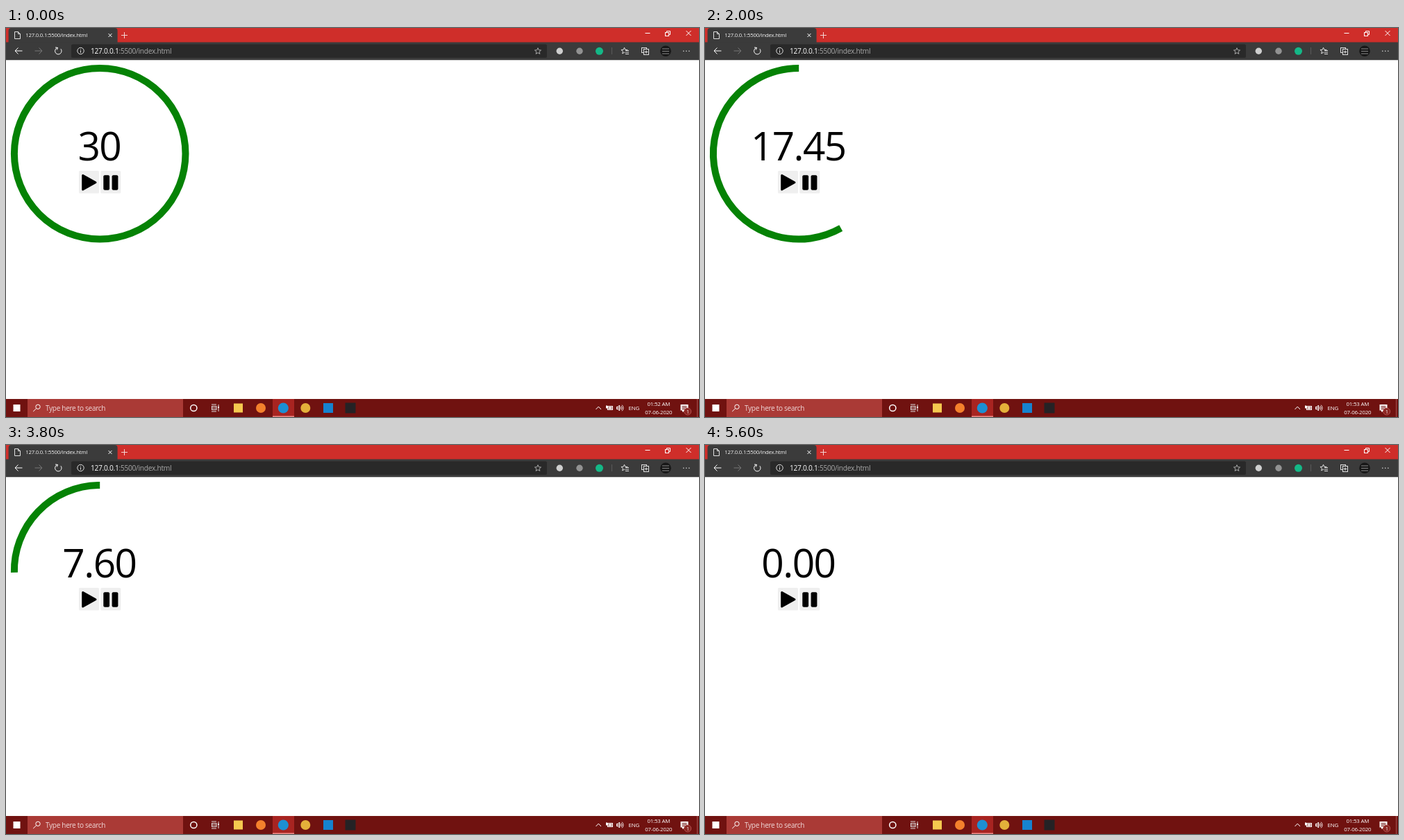
These frames come from a looping animation (998 by 561 pixels, 5800 ms). An HTML page with a canvas:

```html
<!DOCTYPE html>
<html lang="en">
<head>
<meta charset="utf-8">
<title>Countdown</title>
<style>
html, body { margin: 0; width: 100%; height: 100%; overflow: hidden; background: #fff; }
canvas { display: block; }
</style>
</head>
<body>
<canvas id="stage" width="998" height="561"></canvas>
<script>
const ctx = document.getElementById('stage').getContext('2d');
const TAU = Math.PI * 2, STEP = 200, LOOP = 5800;
const DARK = '#3b3b3b', BAR = '#701210', INK = '#e0e0e0', WHITE = '#fff';
// [step, seconds left]
const KEYS = [[0, 30], [7, 21.1], [10, 17.45], [15, 11.9], [19, 7.6], [24, 2.65], [26.75, 0], [29, 0]];

function rect(x, y, w, h, color, r = 0) {
  ctx.fillStyle = color;
  ctx.beginPath();
  ctx.roundRect(x, y, w, h, r);
  ctx.fill();
}

function disc(x, y, r, color) {
  rect(x - r, y - r, 2 * r, 2 * r, color, r);
}

function square(x, y, size, color) {
  rect(x - size / 2, y - size / 2, size, size, color);
}

function arc(x, y, r, color, width = 1, from = 0, to = TAU) {
  ctx.strokeStyle = color;
  ctx.lineWidth = width;
  ctx.beginPath();
  ctx.arc(x, y, r, from, to);
  ctx.stroke();
}

function frame(x, y, w, h, color) {
  ctx.strokeStyle = color;
  ctx.lineWidth = 1;
  ctx.strokeRect(x, y, w, h);
}

function line(color, ...points) {
  ctx.strokeStyle = color;
  ctx.lineWidth = 1;
  ctx.beginPath();
  for (const [x, y] of points) ctx.lineTo(x, y);
  ctx.stroke();
}

function plus(x, y, r, color) {
  line(color, [x - r, y], [x + r, y]);
  line(color, [x, y - r], [x, y + r]);
}

function cross(x, y, r, color) {
  line(color, [x - r, y - r], [x + r, y + r]);
  line(color, [x - r, y + r], [x + r, y - r]);
}

// Evenly spaced horizontal strokes
function rows(x, y, w, gap, color) {
  for (let i = 0; i < 3; i++) line(color, [x, y + i * gap], [x + w, y + i * gap]);
}

function arrow(x, y, dir, color) {
  const tip = x + dir * 5;
  line(color, [x - dir * 5.5, y], [tip, y]);
  line(color, [tip - dir * 4.5, y - 4.5], [tip, y], [tip - dir * 4.5, y + 4.5]);
}

function star(x, y, r, color) {
  const points = Array.from({ length: 11 }, (_, i) => {
    const a = i * TAU / 10 - TAU / 4, d = i % 2 ? r * 0.45 : r;
    return [x + d * Math.cos(a), y + d * Math.sin(a)];
  });
  line(color, ...points);
}

function text(str, x, y, size, color, align = 'left') {
  ctx.font = `${size}px "Open Sans", "Noto Sans", sans-serif`;
  ctx.letterSpacing = `${-0.028 * size}px`;
  ctx.textAlign = align;
  ctx.fillStyle = color;
  ctx.fillText(str, x, y);
  return x + ctx.measureText(str).width;
}

function tabStrip() {
  rect(0, 0, 998, 21, '#cf2e2a');
  rect(3.6, 0, 157, 24, DARK, [4, 4, 0, 0]);
  line(INK, [17.5, 5.5], [12.5, 5.5], [12.5, 15.5], [20.5, 15.5], [20.5, 8.5], [17.5, 5.5], [17.5, 8.5], [20.5, 8.5]);
  text('127.0.0.1:5500/index.html', 28.2, 13, 7.8, '#f4f4f4');
  cross(150, 10.5, 2.5, WHITE);
  plus(170.5, 10.5, 4.5, '#f3d5d4');
  line(WHITE, [920.5, 7.5], [927.5, 7.5]);
  frame(949.5, 6.5, 5, 5, WHITE);
  line(WHITE, [951.5, 6.5], [951.5, 4.5], [956.5, 4.5], [956.5, 9.5], [954.5, 9.5]);
  cross(983, 7.5, 3.5, WHITE);
}

function toolbar() {
  rect(0, 20.6, 998, 25.7, DARK);
  arrow(18, 33, -1, WHITE);
  arrow(47, 33, 1, '#777');
  arc(75.3, 33.2, 4.7, WHITE, 1, -0.7, 4.5);
  line(WHITE, [71, 28], [74.5, 28.4], [73.4, 31.5]);

  rect(94, 23.5, 685, 19.5, '#292929', 2);
  arc(107.5, 33, 4.7, INK);
  rect(107, 32.2, 1, 3.6, INK);
  square(107.5, 30.7, 1, INK);
  text(':5500/index.html', text('127.0.0.1', 122, 37, 10.2, WHITE), 37, 10.2, '#a9a9a9');

  star(766, 33.5, 4.8, '#aaa');
  disc(797.3, 33.3, 4.7, '#cfcfcf');
  disc(826, 33.3, 4.7, '#929292');
  disc(854.5, 33.3, 5.5, '#14b887');
  rect(872, 28, 1, 10, '#5a5a5a');
  star(890.5, 33, 4.8, INK);
  square(894.5, 35.5, 6, DARK);
  rows(892, 32.5, 5, 2.5, INK);
  frame(915.5, 28.5, 7, 7, INK);
  rect(918, 30, 8, 9, DARK);
  frame(918.5, 30.5, 7, 8, INK);
  plus(922, 34.5, 2.2, INK);

  disc(950, 33.3, 7.8, '#171717');
  rows(945, 30, 10, 3.5, '#888');
  for (let i = 0; i < 3; i++) disc(975.8 + i * 4, 33.3, 0.8, INK);
}

function launchers() {
  square(15.5, 548, 10, WHITE);
  arc(270.3, 548, 4.6, WHITE, 1.5);
  frame(296.5, 545.5, 6.5, 5, INK);
  rows(296, 543, 7, 5, INK);
  line(INK, [306, 543], [306, 553]);
  square(306, 547, 2, WHITE);

  rect(384, 535, 31, 26, '#a82421');
  rect(384, 559.5, 31, 1.5, '#ef8d89');
  square(334.5, 548, 13, '#f5c94f');
  disc(367, 548, 7, '#f4812c');
  disc(399.3, 548, 7.6, '#1d8fd3');
  disc(431.3, 548, 7, '#e4b13a');
  square(464, 548, 14, '#1683cf');
  square(496, 548, 15, '#252225');
}

function tray(clock) {
  line(WHITE, [849.5, 550], [853.3, 546], [857, 550]);
  frame(866.5, 545.5, 7, 5, WHITE);
  rect(867.5, 546.5, 5, 3, WHITE);
  rect(864, 544.5, 2, 4, WHITE);
  frame(879.5, 546.5, 2, 3, WHITE);
  line(WHITE, [881, 546.5], [883.5, 544], [883.5, 552], [881, 549.5]);
  for (let i = 0; i < 3; i++) arc(883, 548, 2 + i * 2, WHITE, 0.9, -0.8, 0.8);

  text('ENG', 896.5, 551, 8, WHITE);
  text(clock, 939.8, 544.8, 7.9, WHITE, 'center');
  text('07-06-2020', 939.8, 556.8, 7.9, WHITE, 'center');

  rect(971.5, 543, 11, 8.5, WHITE);
  rect(974, 551, 2, 2.5, WHITE);
  rows(973.5, 545.5, 7, 2, BAR);
  disc(981.7, 553, 5, '#8b2421');
  arc(981.7, 553, 5, '#c66a67', 0.7);
  text('1', 981.8, 555.8, 7.5, WHITE, 'center');
  rect(995, 535, 1, 26, '#a65350');
}

function taskbar(clock) {
  rect(0, 535, 998, 26, BAR);
  rect(31, 535, 224, 26, '#aa3a36');
  arc(46, 546.3, 3.2, WHITE);
  line(WHITE, [43.7, 548.7], [39.2, 553]);
  text('Type here to search', 57, 551.7, 10, '#f0dada');
  launchers();
  tray(clock);
}

function buttons() {
  for (const x of [105, 136.3]) rect(x, 206, 29, 32.5, '#efefef', 1.5);
  for (const x of [140.3, 152.6]) rect(x, 212.2, 8.8, 21.6, '#000', 2);
  ctx.save();
  ctx.fillStyle = ctx.strokeStyle = '#000';
  ctx.lineWidth = 3;
  ctx.lineJoin = 'round';
  ctx.beginPath();
  ctx.moveTo(110.7, 212.5);
  ctx.lineTo(129, 222.7);
  ctx.lineTo(110.7, 233);
  ctx.closePath();
  ctx.fill();
  ctx.stroke();
  ctx.restore();
}

function secondsLeft(step) {
  const i = KEYS.findIndex(k => k[0] > step);
  const [s0, v0] = KEYS[i - 1], [s1, v1] = KEYS[i];
  const v = v0 + (v1 - v0) * (step - s0) / (s1 - s0);
  return Math.round(v * 20) / 20;
}

function timer(left) {
  const top = -TAU / 4;
  if (left > 0) arc(135.2, 181.3, 123.3, '#058205', 10, top + TAU * (1 - left / 30), top + TAU);
  text(left === 30 ? '30' : left.toFixed(2), 134.3, 191, 56.7, '#000', 'center');
}

function draw(now) {
  const step = Math.floor(now % LOOP / STEP);
  rect(0, 0, 998, 561, WHITE);
  tabStrip();
  toolbar();
  timer(secondsLeft(step));
  buttons();
  taskbar(step < 4 ? '01:52 AM' : '01:53 AM');
}

const start = performance.now();
function tick() {
  draw(performance.now() - start);
  requestAnimationFrame(tick);
}
tick();
</script>
</body>
</html>
```
